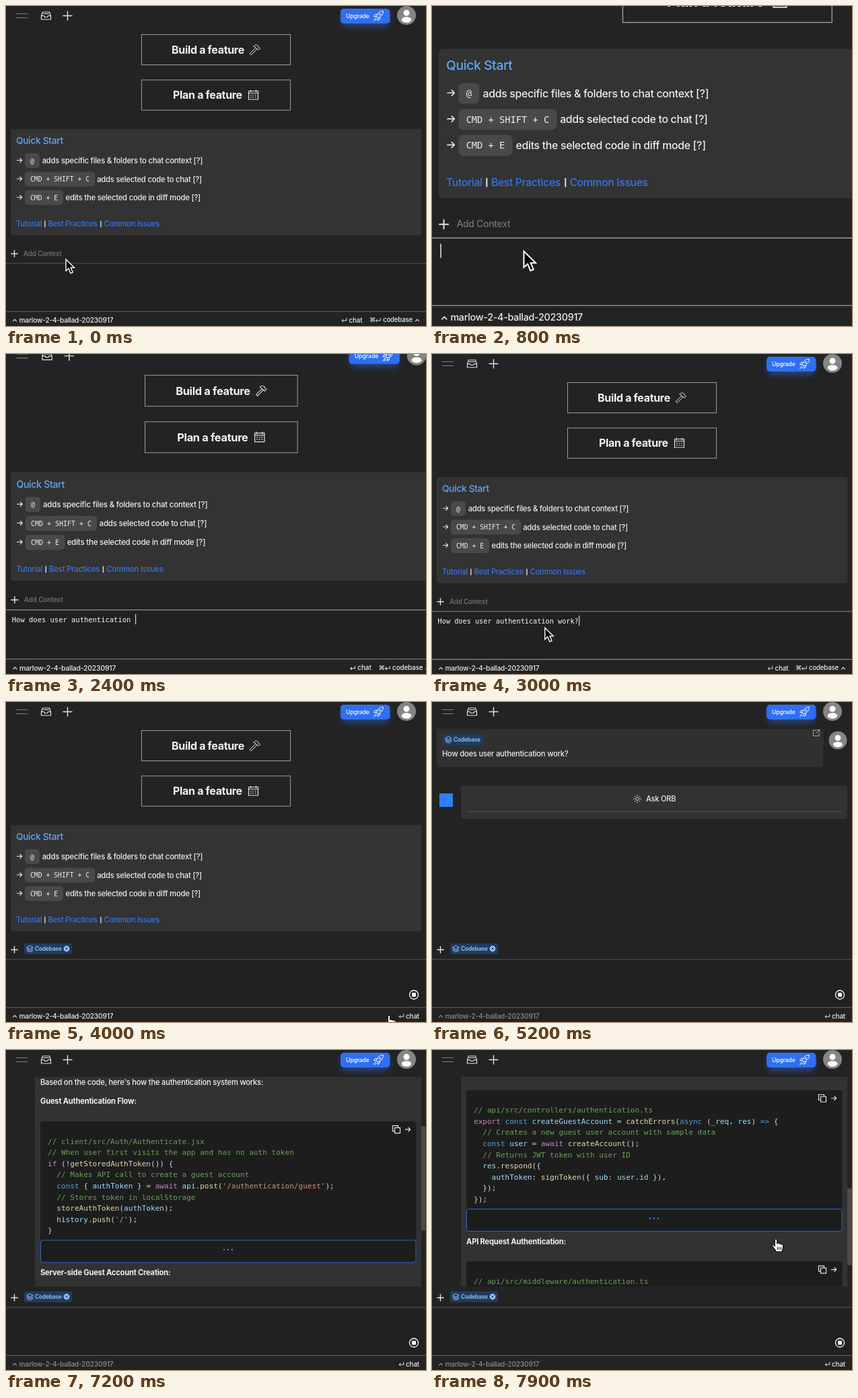
An HTML page for the animation above (8 s loop, 624 by 476 pixels).

```html
<!DOCTYPE html>
<html lang="en">
<head>
<meta charset="utf-8">
<title>Code chat</title>
<style>
html, body { margin: 0; width: 100%; height: 100%; overflow: hidden; background: #232323; }
svg { display: block; width: 100vw; height: 100vh; font-weight: 500; }
text { font-family: Inter, sans-serif; letter-spacing: -.02em; white-space: pre; }
.mono { font-family: "DejaVu Sans Mono", monospace; letter-spacing: 0; }
.ico { fill: none; stroke: #e4e4e4; stroke-width: 1.2; stroke-linecap: round; stroke-linejoin: round; }
</style>
</head>
<body>
<svg id="stage" viewBox="0 0 624 476" preserveAspectRatio="none"></svg>
<script>
const LOOP = 8000, QUESTION = "How does user authentication work?";
const BLUE = "#2f6ff0", LINK = "#3574e8";
const TYPE = 1010, SEND = 3600, REPLY = 4200, STREAM = 5424;
const PITCH = 16.6;

const clamp = (v, a = 0, b = 1) => Math.min(b, Math.max(a, v));
const ease = p => p < .5 ? 4 * p ** 3 : 1 - 4 * (1 - p) ** 3;
const phase = (t, a, b) => ease(clamp((t - a) / (b - a)));

// y is the middle of the capital letters
const text = (x, y, size, s, fill = "#ececec", more = "") =>
  `<text x="${x}" y="${y + size * .36}" font-size="${size}" fill="${fill}" ${more}>${s}</text>`;
const mono = (x, y, size, s, fill = "#ececec") => text(x, y, size, s, fill, 'class="mono"');
const rect = (x, y, w, h, fill, rx = 0, more = "") =>
  `<rect x="${x}" y="${y}" width="${w}" height="${h}" rx="${rx}" fill="${fill}" ${more}/>`;
const icon = (x, y, d, more = "") =>
  `<path class="ico" transform="translate(${x} ${y})" d="${d}" ${more}/>`;
const arrow = (x, y) => icon(x, y, "M-3.6 0H3.6M.8 -2.9L3.7 0L.8 2.9");
const enter = (x, y) => icon(x, y, "M3.3 -2.5V1H-3.3M-1.5 -.8L-3.3 1L-1.5 2.8", 'style="stroke-width:1"');
const caretUp = (x, y) => icon(x, y, "M-2.5 1.3L0 -1.3L2.5 1.3");
const plus = (x, y, r) => icon(x, y, `M${-r} 0H${r}M0 ${-r}V${r}`, 'style="stroke-width:1.4"');

function person(x, y, r, id) {
  return `<clipPath id="${id}"><circle cx="${x}" cy="${y}" r="${r}"/></clipPath>
    <circle cx="${x}" cy="${y}" r="${r}" fill="#858585"/>
    <g fill="#fff" clip-path="url(#${id})"><circle cx="${x}" cy="${y - r * .27}" r="${r * .32}"/>
    <ellipse cx="${x}" cy="${y + r * .46}" rx="${r * .52}" ry="${r * .3}"/></g>`;
}

function chip(x, y, w, close) {
  const c = "#9cc3f5", cx = x + w - 8;
  return rect(x, y - 8, w, 16, "#1f3b60", 2) +
    icon(x + 8.5, y, "M-4.5 -2L0 -4.5L4.5 -2L0 .5ZM-4.5 .3L0 2.8L4.5 .3M-4.5 2.5L0 5L4.5 2.5", `style="stroke:${c};stroke-width:1"`) +
    text(x + 16, y, 8.4, "Codebase", c, 'font-weight="600"') +
    (close ? `<circle cx="${cx}" cy="${y}" r="4.4" fill="${c}"/>` +
      icon(cx, y, "M-1.6 -1.6L1.6 1.6M1.6 -1.6L-1.6 1.6", 'style="stroke:#1f3b60;stroke-width:1"') : "");
}

const header =
  icon(23.5, 14.5, "M-8 -3H8M-8 3H8", 'style="stroke:#808080"') +
  icon(59.5, 14.5, "M-5 -5.5H5L7 0V5.5H-7V0ZM-7 0H-3L-2 2H2L3 0H7M-4 -3H4") +
  plus(91.5, 14.5, 6.5) +
  rect(499, 9, 70, 22, BLUE, 6, 'opacity=".45" filter="url(#glow)"') +
  rect(497, 4, 73.5, 22, BLUE, 5) +
  text(505, 14.7, 8.7, "Upgrade", "#fff") +
  icon(553.5, 14.5, "M-3 1C-2 -4 2 -7 7 -7C7 -2 4 2 -1 3ZM-2 -2H-5L-7 1L-3 1M2 2V5L-1 7L-1 3M-4 3L-7 7M-3 5L-5 7", 'style="stroke:#fff;stroke-width:1"') +
  `<circle cx="555.5" cy="12.5" r="1.4" fill="none" stroke="#fff"/>` +
  person(595, 14, 14, "me");

function bigButton(y, label, x) {
  return rect(201.5, y - 22.5, 221, 45, "none", 0, 'stroke="#9c9c9c"') +
    text(x, y, 16, label, "#f4f4f4", 'font-weight="700"');
}

function tip(y, keys, w, x, label) {
  return arrow(20, y - .5) + rect(28, y - 11, w, 22, "#494949", 5) +
    mono(36, y, 9.75, keys) + text(x, y, 11.28, label);
}

const bar = x => rect(x, 319.5, 1.3, 9.5, "#ececec");

const home =
  bigButton(65, "Build a feature", 246) +
  icon(370, 65, "M-7.5 5.5L1 -3L3 -1L-5.5 7.5ZM-2 -5.5C0 -7.5 3 -7.5 5 -5.5L5 -4L7.5 -2L5 .5L1 -3Z", 'style="stroke-width:1"') +
  bigButton(132.5, "Plan a feature", 248) +
  icon(367.5, 132.5, "M-7 -6H7V6.5H-7ZM-7 -3H7M-4 -7.5V-5M4 -7.5V-5M-4 0H-3M-.5 0H.5M3 0H4M-4 3H-3M-.5 3H.5M3 3H4") +
  rect(7, 183, 610.5, 158, "#333", 4) +
  text(15, 200.5, 13.7, "Quick Start", "#62a6f5") +
  tip(230, "@", 22, 53.7, "adds specific files &amp; folders to chat context [?]") +
  tip(257.5, "CMD + SHIFT + C", 104, 135.2, "adds selected code to chat [?]") +
  tip(285, "CMD + E", 57, 88.5, "edits the selected code in diff mode [?]") +
  text(15, 324, 11.15, "Tutorial", LINK) + bar(57.2) +
  text(62.5, 324, 11.15, "Best Practices", LINK) + bar(140.3) +
  text(145.5, 324, 11.15, "Common Issues", LINK);

const answer = [
  { p: "Based on the code, here's how the authentication system works:" },
  { h: "Guest Authentication Flow:" },
  { code: `// client/src/Auth/Authenticate.jsx
// When user first visits the app and has no auth token
if (!getStoredAuthToken()) {
  // Makes API call to create a guest account
  const { authToken } = await api.post('/authentication/guest');
  // Stores token in localStorage
  storeAuthToken(authToken);
  history.push('/');
}` },
  { h: "Server-side Guest Account Creation:" },
  { code: `// api/src/controllers/authentication.ts
export const createGuestAccount = catchErrors(async (_req, res) => {
  // Creates a new guest user account with sample data
  const user = await createAccount();
  // Returns JWT token with user ID
  res.respond({
    authToken: signToken({ sub: user.id }),
  });
});` },
  { h: "API Request Authentication:" },
  { code: `// api/src/middleware/authentication.ts
export const authenticateUser = catchErrors(async (req, _res, next) => {
  const token = getAuthTokenFromRequest(req);
  next();
});` }
];

const TOKEN = /(\/\/.*)|('[^']*')|\b(if|await|export)\b|(\bconst\b|\basync\b|=>)|(\w+(?=\())|([A-Za-z_]\w*)|\s+|./g;
const TINT = ["#6a9f58", "#ce9178", "#c586c0", "#569cd6", "#dcdcaa", "#9cdcfe"];

function paint(line, n) {
  let out = "";
  for (const m of line.matchAll(TOKEN)) {
    if (n <= 0) break;
    const k = m.slice(1).findIndex(Boolean);
    out += `<tspan fill="${TINT[k] || "#d4d4d4"}">${m[0].slice(0, n).replace(/>/g, "&gt;")}</tspan>`;
    n -= m[0].length;
  }
  return out;
}

function codeBlock(top, code, n) {
  let y = top + 29.5, body = "";
  for (const line of code.split("\n")) {
    if (n <= 0) break;
    body += mono(62, y, 11.06, paint(line, n));
    n -= line.length;
    y += PITCH;
  }
  const foot = y - PITCH + 14.5;
  const dots = [-6, 0, 6].map(d => `<circle cx="${330 + d}" cy="${foot + 14}" r="1.2" fill="#3b82f6"/>`).join("");
  const svg = rect(51, top, 558.5, foot + 33 - top, "#1d1d1d", 3) + body +
    rect(51.5, foot, 557.5, 33, "#1d1d1d", 3, 'stroke="#2c66cc"') + dots +
    icon(580, top + 12, "M-2.5 -2.5H5.5V5.5H-2.5ZM-2.5 2.5H-5.5V-5.5H2.5V-2.5") + arrow(597, top + 12);
  return { svg, end: foot + 33 };
}

function reply(n) {
  let y = 168, svg = "";
  for (const part of answer) {
    if (n <= 0) break;
    const s = part.p || part.h || part.code;
    if (part.code) {
      const b = codeBlock(y, s, n);
      svg += b.svg;
      y = b.end;
      n -= s.replace(/\n/g, "").length;
    } else {
      svg += text(51, y + 15, 11.2, s.slice(0, n), "#f0f0f0", part.h ? 'font-weight="700"' : "");
      y += part.p ? 28.5 : 45;
      n -= s.length;
    }
  }
  return { svg, end: y };
}

function chat(t) {
  const body = reply(Math.floor((t - STREAM) * .36));
  const full = body.end - 25, view = 312;
  const scroll = Math.min(1.751e-4 * Math.max(0, t - 6322) ** 2, Math.max(0, full - view));
  const span = 306 / full;
  const edit = icon(571, 46, "M0 -4H-4.5V4.5H4V0M-1 1L4.5 -4.5M2 -4.5H4.5V-2", 'style="stroke:#aaa;stroke-width:1"');
  return `<g clip-path="url(#view)"><g transform="translate(0 ${-scroll})">` +
    rect(7, 39, 574.5, 58, "#303030", 3) + chip(16, 56, 61, false) +
    text(15, 77, 11.2, QUESTION) + edit + person(603, 57, 13.5, "you") +
    rect(11, 136, 20, 20, "#2f80f5") +
    rect(43, 124.5, 574, body.end + 6 - 124.5, "#323232", 4) +
    icon(305, 144, "M-2.5 0A2.5 2.5 0 1 0 2.5 0A2.5 2.5 0 1 0 -2.5 0M0 -5.5V-4.5M0 4.5V5.5M-5.5 0H-4.5M4.5 0H5.5M-4 -4L-3.3 -3.3M3.3 3.3L4 4M-4 4L-3.3 3.3M3.3 -3.3L4 -4", 'style="stroke-width:1"') +
    text(318, 144, 11.1, "Ask ORB") + rect(51, 162.5, 558.5, 1, "#505050") + body.svg + "</g></g>" +
    (full > view ? rect(617, 46 + scroll * span, 6.5, view * span, "#4b4b4b") : "");
}

function composer(t) {
  const sent = t >= SEND, focus = t > 700 && !sent;
  const line = focus ? "#8b8b8b" : "#565656";
  let out = plus(12.5, 368.5, 4.7) +
    (sent ? chip(27, 367, 71, true) : text(26, 368, 9.9, "Add Context", "#757575")) +
    rect(-2, 383, 628, 71.3, "#212121", 2, `stroke="${line}" stroke-width="1.2"`);
  if (focus) {
    const n = clamp(Math.floor((t - TYPE) / 47.5), 0, QUESTION.length);
    out += mono(8.6, 397, 10.23, QUESTION.slice(0, n), "#f8f8f8") +
      rect(8.8 + n * 6.16, 389, 1, 15, "#f2f2f2");
  }
  if (sent) out += '<circle cx="606" cy="435.5" r="6.5" fill="none" stroke="#fff" stroke-width="1.3"/>' +
    rect(603, 432.5, 6, 6, "#fff", 1);
  const dim = t >= REPLY ? "#8c8c8c" : "#ececec";
  out += `<g opacity="${t >= REPLY ? .6 : 1}">${caretUp(13, 467.5)}</g>` +
    text(19.5, 467, 10.2, "marlow-2-4-ballad-20230917", dim);
  if (sent) return out + enter(587.5, 467) + text(594, 467, 10, "chat");
  return out + enter(502.5, 467) + text(509.5, 467, 9.9, "chat") +
    text(540, 467, 9.5, "⌘") + enter(553, 467) + text(560, 467, 9.7, "codebase") + caretUp(611, 467.5);
}

const pointer = (x, y) => `<path transform="translate(${x} ${y})" fill="#000" stroke="#fff" stroke-width="1.4"
  d="M0 0V17L4 13.4L7 20.5L10.2 19.2L7.2 12.3H12.5Z"/>`;
const hand = (x, y) => `<path transform="translate(${x} ${y})" fill="#fff" stroke="#000" stroke-width="1.1" stroke-linejoin="round"
  d="M-1.6 1.5C-1.6 -.6 1.4 -.6 1.6 1.5V7C2 5.3 4.5 5.5 4.7 7.4C5.4 6 7.6 6.4 7.8 8.3C9 7.2 10.6 7.9 10.6 9.5V13C10.6 15 9 16 9 19H0C0 16.5 -3 14.5 -5 11C-6 9 -4 8 -2.6 9.6L-1.6 11Z"/>
  <path transform="translate(${x} ${y})" stroke="#000" d="M2.5 12V16M5 12V16M7.5 12V16"/>`;

function cursor(t) {
  if (t < 1000) {
    const p = phase(t, 100, 600);
    return pointer(89 + 8 * p, 377 + 20 * p);
  }
  if (t >= 2700 && t < 4500) {
    const p = phase(t, 2750, 3500), x = 97 + 472 * p, y = 397 + 69 * p;
    return (t > 3350 ? hand : pointer)(x, y);
  }
  return t >= 7500 ? hand(511, 281) : "";
}

const stage = document.getElementById("stage");
stage.innerHTML = `<defs><filter id="glow" x="-30%" y="-80%" width="160%" height="260%"><feGaussianBlur stdDeviation="5"/></filter>
  <clipPath id="view"><rect x="0" y="40" width="624" height="312"/></clipPath></defs>
  ${rect(0, 0, 624, 476, "#232323")}
  <g id="zoom"><g>${header}</g><g id="home">${home}</g><g id="live"></g></g>`;
const zoom = document.getElementById("zoom");
const homeView = document.getElementById("home");
const live = document.getElementById("live");

function draw(t) {
  const s = 1 + .425 * (phase(t, 100, 1000) - phase(t, 1722, 2622));
  zoom.setAttribute("transform", `translate(0 ${476 * (1 - s)}) scale(${s})`);
  homeView.style.display = t < REPLY ? "" : "none";
  live.innerHTML = (t >= REPLY ? chat(t) : "") + composer(t) + cursor(t);
}

const start = performance.now();
function tick(now) {
  draw(Math.max(0, now - start) % LOOP);
  requestAnimationFrame(tick);
}
draw(0);
requestAnimationFrame(tick);
</script>
</body>
</html>
```
